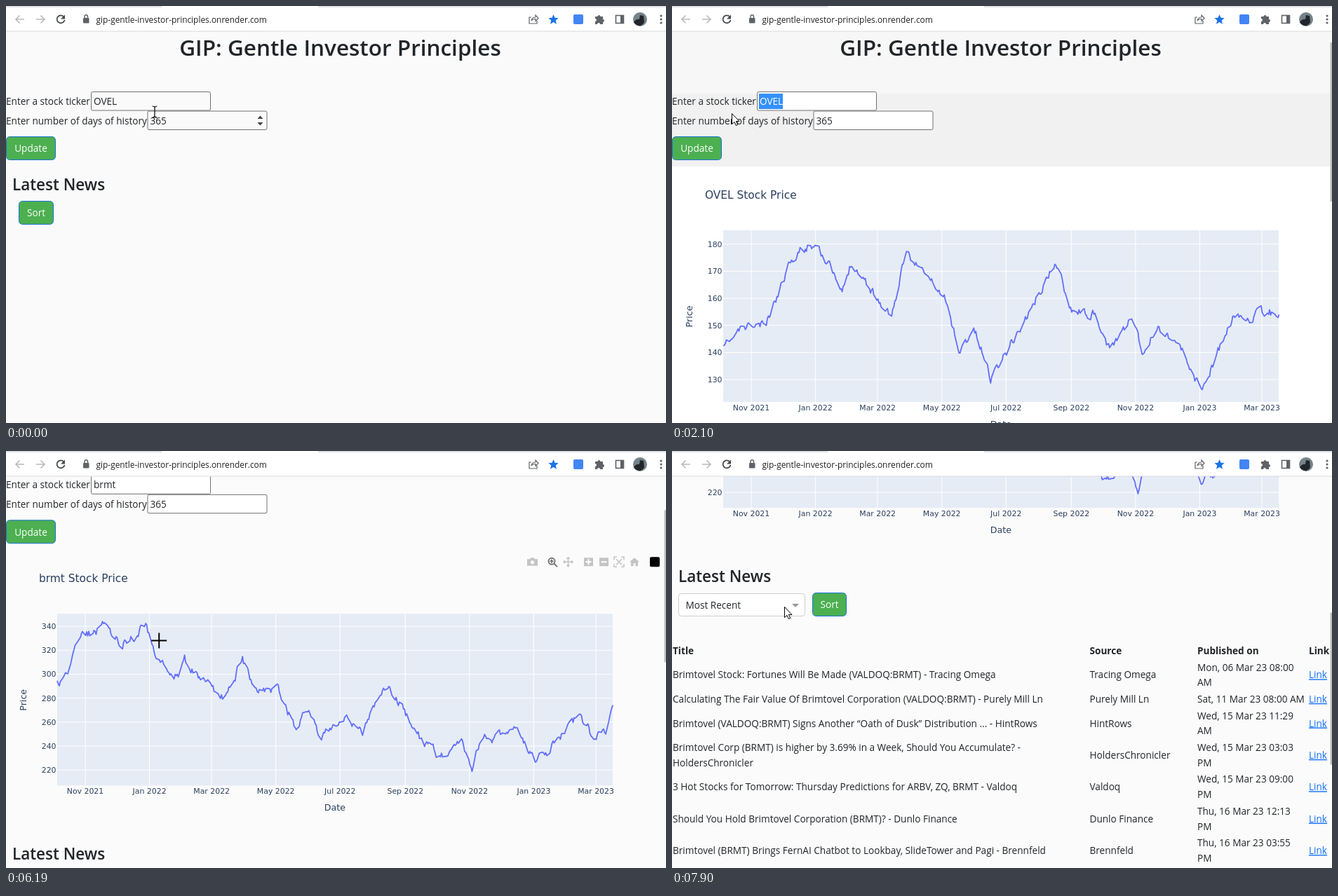
Animation of 941x595 px, one loop 8000 ms. Source, as an HTML page:

```html
<!DOCTYPE html>
<html lang="en">
<head>
<meta charset="utf-8">
<title>Stock dashboard</title>
<style>
html, body { margin: 0; width: 100%; height: 100%; overflow: hidden; background: #fafafa; }
svg { display: block; }
text { font: 13.6px "Open Sans", "Noto Sans", sans-serif; fill: #212529; white-space: pre; }
.h1 { font-size: 31.5px; font-weight: 600; text-anchor: middle; }
.h2 { font-size: 22.5px; font-weight: 600; }
.th { font-weight: 700; }
.link { fill: #0d6efd; text-decoration: underline; }
.btn { fill: #fff; text-anchor: middle; }
.url { font-size: 11.9px; fill: #202124; }
.plot { font: 10.9px "DejaVu Sans", sans-serif; fill: #2a3f5f; }
.mid { text-anchor: middle; }
.end { text-anchor: end; }
.axis { font-size: 12.7px; }
.name { font-size: 15.4px; }
.tip { font: 11.8px "Liberation Sans", sans-serif; fill: #fff; }
</style>
</head>
<body>
<svg id="stage" width="941" height="595" viewBox="0 0 941 595"></svg>
<script>
const LINE = 21.7, DAY_MS = 864e5, DAY_PX = 1.501;

const text = (x, y, s, cls = '', more = '') => `<text x="${x}" y="${y}" class="${cls}" ${more}>${s}</text>`;
const rect = (x, y, w, h, fill, more = '') => `<rect x="${x}" y="${y}" width="${w}" height="${h}" fill="${fill}" ${more}/>`;
const path = (d, more) => `<path d="${d}" ${more}/>`;
const stroke = (color, width) => `fill="none" stroke="${color}" stroke-width="${width}"`;
const group = (id, body) => `<g id="${id}">${body}</g>`;
const button = (x, y, w, label) =>
  rect(x + .5, y + .5, w - 1, 33, '#4caf50', 'rx="5" stroke="#1a73d8"') + text(x + w / 2, y + 22.3, label, 'btn');
const field = (id, x, y) => rect(x + .5, y + .5, 170, 26.5, '#fff', `id="${id}" rx="2" stroke="#707070"`);

// Linear interpolation through [position, ...values] keys
function along(keys, at) {
  const i = keys.findIndex(k => k[0] > at);
  if (i < 0) return keys.at(-1).slice(1);
  const a = keys[i - 1], b = keys[i], k = (at - a[0]) / (b[0] - a[0]);
  return a.slice(1).map((v, n) => v + (b[n + 1] - v) * k);
}

function cell(x, center, s, cls) {
  const lines = s.split('|');
  return lines.map((l, i) => text(x, center + 5 + (i - (lines.length - 1) / 2) * LINE, l, cls)).join('');
}

function table(top, sourceX, rows) {
  let y = top, out = '';
  for (const [i, row] of [['Title', 'Source', 'Published on'], ...rows].entries()) {
    const height = LINE * Math.max(...row.map(s => s.split('|').length)) + 2;
    const center = y + height / 2, cls = i ? '' : 'th';
    out += [1, sourceX, 749].map((x, k) => cell(x, center, row[k], cls)).join('')
         + cell(908, center, 'Link', i ? 'link' : 'th');
    y += height;
  }
  return out;
}

const firstNews = [
  ['Ovelo Stock (VALDOQ:OVEL): 2023 Could Be Its Most Exciting Year ... - HintRows', 'HintRows', 'Mon, 27 Feb 23 08:00|AM'],
  ['Analyst Highlights 5 Catalysts for OVEL - HintRows', 'HintRows', 'Fri, 03 Mar 23 08:00 AM'],
  ["Ovelo downgraded by GlowHutch on 'conservative' oSlate forecast ... - Tracing Omega", 'Tracing Omega', 'Fri, 10 Mar 23 12:44 PM'],
  ['Is Ovelo Inc. (VALDOQ:OVEL) Worth US$153 Based On Its Intrinsic Value? - Purely Mill Ln', 'Purely Mill Ln', 'Wed, 15 Mar 23 10:14|AM'],
  ['Ovelo Joins Cost Cut Bandwagon, Eases On Bonus, Hiring, Triggers ... - Dunlo Finance', 'Dunlo Finance', 'Wed, 15 Mar 23 02:58|PM'],
  ['10 Stocks TalkZQR Says Will Make Me Rich in 10 Years - Dunlo Finance', 'Dunlo Finance', 'Thu, 16 Mar 23 02:38|PM']
];
const secondNews = [
  ['Brimtovel Stock: Fortunes Will Be Made (VALDOQ:BRMT) - Tracing Omega', 'Tracing Omega', 'Mon, 06 Mar 23 08:00|AM'],
  ['Calculating The Fair Value Of Brimtovel Corporation (VALDOQ:BRMT) - Purely Mill Ln', 'Purely Mill Ln', 'Sat, 11 Mar 23 08:00 AM'],
  ['Brimtovel (VALDOQ:BRMT) Signs Another “Oath of Dusk” Distribution ... - HintRows', 'HintRows', 'Wed, 15 Mar 23 11:29|AM'],
  ['Brimtovel Corp (BRMT) is higher by 3.69% in a Week, Should You Accumulate? -|HoldersChronicler', 'HoldersChronicler', 'Wed, 15 Mar 23 03:03|PM'],
  ['3 Hot Stocks for Tomorrow: Thursday Predictions for ARBV, ZQ, BRMT - Valdoq', 'Valdoq', 'Wed, 15 Mar 23 09:00|PM'],
  ['Should You Hold Brimtovel Corporation (BRMT)? - Dunlo Finance', 'Dunlo Finance', 'Thu, 16 Mar 23 12:13|PM'],
  ['Brimtovel (BRMT) Brings FernAI Chatbot to Lookbay, SlideTower and Pagi - Brennfeld', 'Brennfeld', 'Thu, 16 Mar 23 03:55|PM']
];

// Turning points as [day, price]; the daily wobble is seeded noise
const ovel = [[0, 141], [18, 149], [41, 150], [65, 176], [90, 181], [113, 161], [122, 174], [159, 153], [175, 177],
  [210, 160], [225, 140], [238, 149], [254, 131], [291, 155], [315, 173], [331, 157], [351, 154], [366, 141],
  [388, 153], [399, 138], [411, 150], [432, 144], [454, 126], [484, 152], [528, 155]];
const brmt = [[0, 291], [11, 303], [23, 330], [45, 341], [61, 326], [85, 341], [94, 314], [111, 292], [121, 311],
  [159, 279], [176, 313], [191, 282], [210, 288], [226, 254], [239, 273], [251, 245], [274, 267], [290, 255], [313, 292],
  [351, 239], [371, 228], [383, 246], [394, 218], [401, 244], [434, 252], [456, 225], [496, 268], [508, 249], [521, 250], [528, 278]];

const firstDay = Date.UTC(2021, 9, 5);
const dayX = day => 73 + day * DAY_PX;

function curve(prices, toY, seed) {
  const random = () => (seed = seed * 16807 % 2147483647) / 2147483647 - .5;
  const points = [];
  let wobble = 0;
  for (let day = 0; day <= 528; day++) {
    if (new Date(firstDay + day * DAY_MS).getUTCDay() % 6 === 0) continue;
    wobble = wobble * .65 + random() * 12;
    points.push(`${dayX(day).toFixed(1)} ${(toY(along(prices, day)[0]) + wobble).toFixed(1)}`);
  }
  return path('M' + points.join('L'), stroke('#636efa', 1.8) + ' stroke-linejoin="round"');
}

function series(id, name, prices, seed, lowest, step, lowestY, spacing) {
  const toY = price => lowestY - (price - lowest) / step * spacing;
  let grid = '';
  for (let price = lowest; toY(price) > 325; price += step)
    grid += path(`M73 ${toY(price)}H865`, stroke('#fff', 1)) + text(71.5, toY(price) + 4, price, 'plot end');
  return group(id, grid + curve(prices, toY, seed) + text(47, 275, name + ' Stock Price', 'plot name'));
}

function months() {
  let out = '';
  for (let i = 0; i < 9; i++) {
    const date = new Date(Date.UTC(2021, 10 + 2 * i, 1));
    const x = dayX((date - firstDay) / DAY_MS) - .5;
    const label = date.toLocaleString('en-US', { month: 'short', year: 'numeric', timeZone: 'UTC' });
    out += path(`M${x} 320V565`, stroke('#fff', 1)) + text(x, 577, label, 'plot mid');
  }
  return out;
}

const modebar = group('modebar',
  path('M743 242h4l1.500-2h4l1.500 2h4v9.500h-15z', 'fill="#c4c4c4"') + '<circle cx="750.5" cy="246.5" r="2.6" fill="#fff"/>'
  + `<circle cx="778" cy="245" r="4.5" ${stroke('#7b7b7b', 2)}/>` + path('M781 248l5 5M775.500 245h5M778 242.500v5', stroke('#7b7b7b', 2))
  + path('M795 246h13M801.500 239.500v13M797 244l-2 2 2 2M806 244l2 2-2 2M799.500 241.500l2-2 2 2M799.500 250.500l2 2 2-2', stroke('#c4c4c4', 1.6))
  + rect(824, 240, 13, 12, '#c4c4c4') + path('M826.500 246h8M830.500 242v8', stroke('#fff', 2))
  + rect(846, 240, 13, 12, '#c4c4c4') + path('M848.500 246h8', stroke('#fff', 2))
  + path('M867 243v-4h4M877 239h4v4M881 249v4h-4M871 253h-4v-4M870 242l8 8M878 242l-8 8', stroke('#c4c4c4', 1.6))
  + path('M889 246l7-6 7 6h-2v6h-3.500v-4h-3v4h-3.500v-6z', 'fill="#c4c4c4"')
  + rect(918, 239, 14, 14, '#000', 'rx="2"'));

const chart = group('chart',
  rect(0, 229, 938, 400, '#fff', 'id="paper"') + rect(73, 320, 792, 245, '#e5ecf6') + months()
  + series('ovel', 'OVEL', ovel, 11, 130, 10, 533, 38.65)
  + series('brmt', 'brmt', brmt, 29, 220, 20, 543, 34.2)
  + text(469, 601, 'Date', 'plot axis mid')
  + text(29, 443, 'Price', 'plot axis mid', 'transform="rotate(-90 29 443)"')
  + modebar
  + group('tip', path('M210.500 356.500l6-4v-5h116.500v17h-116.500v-4z', 'fill="#636efa"') + text(219, 361, '(Jan 4, 2022, 329.01)', 'tip'))
  + text(9, 671, 'Latest News', 'h2')
  + rect(9.5, 687.5, 180, 32, '#fff', 'rx="4" stroke="#ccc"') + text(19.5, 708.5, 'Most Recent')
  + path('M171 702h10l-5 5z', 'fill="#999"') + button(200, 686, 49, 'Sort')
  + table(757, 595.5, secondNews));

const page = group('page',
  rect(0, 36, 941, 1100, '#fafafa', 'id="backdrop"') + rect(0, 125, 938, 104, '#f1f1f1', 'id="band"')
  + text(0, 71, 'GIP: Gentle Investor Principles', 'h1', 'id="heading"')
  + text(0, 141, 'Enter a stock ticker') + field('tickerField', 121, 122)
  + text(0, 168.5, 'Enter number of days of history') + field('daysField', 201.5, 149.5) + text(205.5, 168.5, '365')
  + group('spinner', path('M358.500 161h8l-4-4.500zM358.500 166h8l-4 4.500z', 'fill="#444"'))
  + rect(124, 125, 34, 22, '#3390ff', 'id="selection"')
  + text(125, 141, '', '', 'id="ticker"') + rect(0, 127, 1, 18, '#000', 'id="caret"')
  + button(0, 186, 71, 'Update')
  + group('early', text(9, 262.5, 'Latest News', 'h2') + button(18, 278, 50, 'Sort') + group('firstNews', table(348.3, 631.5, firstNews)))
  + chart);

const browser = rect(0, 0, 941, 36, '#fff') + rect(0, 0, 222, 2, '#dee1e6') + rect(445, 0, 496, 2, '#dee1e6') + rect(0, 35.5, 941, 1, '#dadce0')
  + path('M26 19H14M19.500 13.500L14 19l5.500 5.500M43 19h12M49.500 13.500L55 19l-5.500 5.500', stroke('#b8babd', 1.6))
  + path('M82.500 15.500A5.500 5.500 0 1 0 83.500 20', stroke('#46494d', 1.8)) + path('M84 12.500v6h-6z', 'fill="#46494d"')
  + rect(110, 17, 8.5, 7.5, '#5f6368', 'rx="1"') + path('M112 17v-2a2.200 2.200 0 0 1 4.500 0v2', stroke('#5f6368', 1.4))
  + text(128.5, 23.5, 'gip-gentle-investor-principles.onrender.com', 'url')
  + path('M749 16h-3v9h11v-4M749 21q1-5 6-5v-3l4 4.500-4 4v-3q-4 0-6 2.500z', stroke('#5f6368', 1.2))
  + path('M780.500 12l2 4.800 5.200.4-4 3.400 1.300 5.100-4.500-2.800-4.500 2.800 1.300-5.100-4-3.400 5.200-.4z', 'fill="#1a73e8"')
  + rect(809, 12, 14, 14, '#4285f4', 'rx="2"')
  + path('M840 15h3.500a2 2 0 0 1 4 0h3.500v4a2 2 0 0 1 0 4v3h-4a2 2 0 0 0-4 0h-3v-4a2 2 0 0 0 0-4z', 'fill="#5f6368"')
  + rect(869.5, 13.5, 11, 11, '#fff', 'stroke="#5f6368" stroke-width="1.6"') + rect(876, 13, 5, 12, '#5f6368')
  + '<circle cx="904" cy="19" r="10" fill="#75838a"/>' + path('M895 23q4-5 8-4l1-6 5 1 1 9q-3 6-8 5-5-1-7-5z', 'fill="#22262c"')
  + [14, 19, 24].map(y => `<circle cx="934" cy="${y}" r="1.6" fill="#5f6368"/>`).join('');

const cursors =
  group('beam', path('M-3.500-8q3 0 3.500 1.500 .5-1.500 3.500-1.500M-3.500 8q3 0 3.500-1.500 .5 1.500 3.500 1.500M0-7V7', stroke('#000', 1.2)))
  + group('ring', `<circle r="9" ${stroke('#333', 1.2)}/>`)
  + group('arrow', path('M.5.500v15l3.500-3 2.300 5 2.400-1-2.300-5h4.600z', 'fill="#fff" stroke="#000"'))
  + group('cross', path('M-11 0H11M0-11V11', stroke('#000', 2)));

document.getElementById('stage').innerHTML =
  page + rect(938.5, 52, 2.5, 0, '#bdbdbd', 'id="thumb"') + browser + group('pointer', cursors);

const el = {};
document.querySelectorAll('[id]').forEach(node => el[node.id] = node);
const show = (id, on) => el[id].style.display = on ? '' : 'none';
const set = (id, name, value) => el[id].setAttribute(name, value);

// The screen refreshes in bursts of evenly spaced steps: [start, end, steps]
const bursts = [[0, 0, 1], [120, 480, 4], [750, 1680, 8], [1820, 1820, 1], [2100, 3040, 8], [3190, 4080, 8],
  [4780, 4780, 1], [5340, 5640, 3], [6040, 6990, 8], [7110, 7900, 6]];

function lastRefresh(now) {
  const [start, end, steps] = bursts.findLast(b => b[0] <= now);
  if (now >= end) return end;
  const gap = (end - start) / (steps - 1);
  return start + Math.floor((now - start) / gap + .05) * gap;
}

const pointerKeys = [[0, 212, 151], [880, 166, 142], [1680, 85, 151], [1820, 85, 153], [2640, 85, 153], [3040, 50, 215],
  [4080, 204, 263], [4780, 204, 263], [6447, 221, 272], [6990, 229, 280], [7260, 229, 280], [7900, 160, 222]];
const scrollKeys = [[0, 0], [5900, 0], [6447, 174], [6990, 342], [7420, 484]];

function draw() {
  const t = lastRefresh(performance.now() % 8000);
  const loaded = t >= 240, charted = t >= 1280, swapped = t >= 4780;
  const [scroll] = along(scrollKeys, t), [x, y] = along(pointerKeys, t);
  const backdrop = !loaded ? '#fafafa' : scroll > 0 ? '#fbfbfb' : '#f7f7f7';

  set('page', 'transform', `translate(0 ${-scroll})`);
  set('backdrop', 'fill', backdrop);
  set('paper', 'fill', scroll > 0 ? backdrop : '#fff');
  set('tickerField', 'fill', loaded ? '#fff' : backdrop);
  set('daysField', 'fill', charted ? '#fff' : backdrop);
  set('heading', 'x', loaded ? 468.5 : 476.5);
  show('band', charted && !scroll);
  show('spinner', t < 120);
  show('early', !charted);
  show('firstNews', loaded);
  show('chart', charted);
  show('ovel', !swapped);
  show('brmt', swapped);
  show('modebar', t >= 3800);
  show('tip', t >= 6300 && t < 6700);

  const selected = charted && t < 2200;
  const typed = Math.max(0, Math.min(4, Math.floor((t - 2100) / 130)));
  el.ticker.textContent = typed ? 'brmt'.slice(0, typed) : 'OVEL';
  el.ticker.style.fill = selected ? '#fff' : '';
  show('selection', selected);
  show('caret', (t >= 880 && !charted) || (typed && t < 3040));
  set('caret', 'x', 126 + el.ticker.getComputedTextLength());

  show('thumb', loaded);
  set('thumb', 'y', 52 + scroll * .369);
  set('thumb', 'height', swapped ? 217 : charted ? 227 : 318);

  const kind = t < 1400 ? 'beam' : t >= 6170 && t < 7420 ? 'cross' : 'arrow';
  for (const id of ['beam', 'arrow', 'cross']) show(id, id === kind);
  show('ring', t >= 880 && !charted);
  set('pointer', 'transform', `translate(${x} ${y})`);
  requestAnimationFrame(draw);
}
draw();
</script>
</body>
</html>
```
